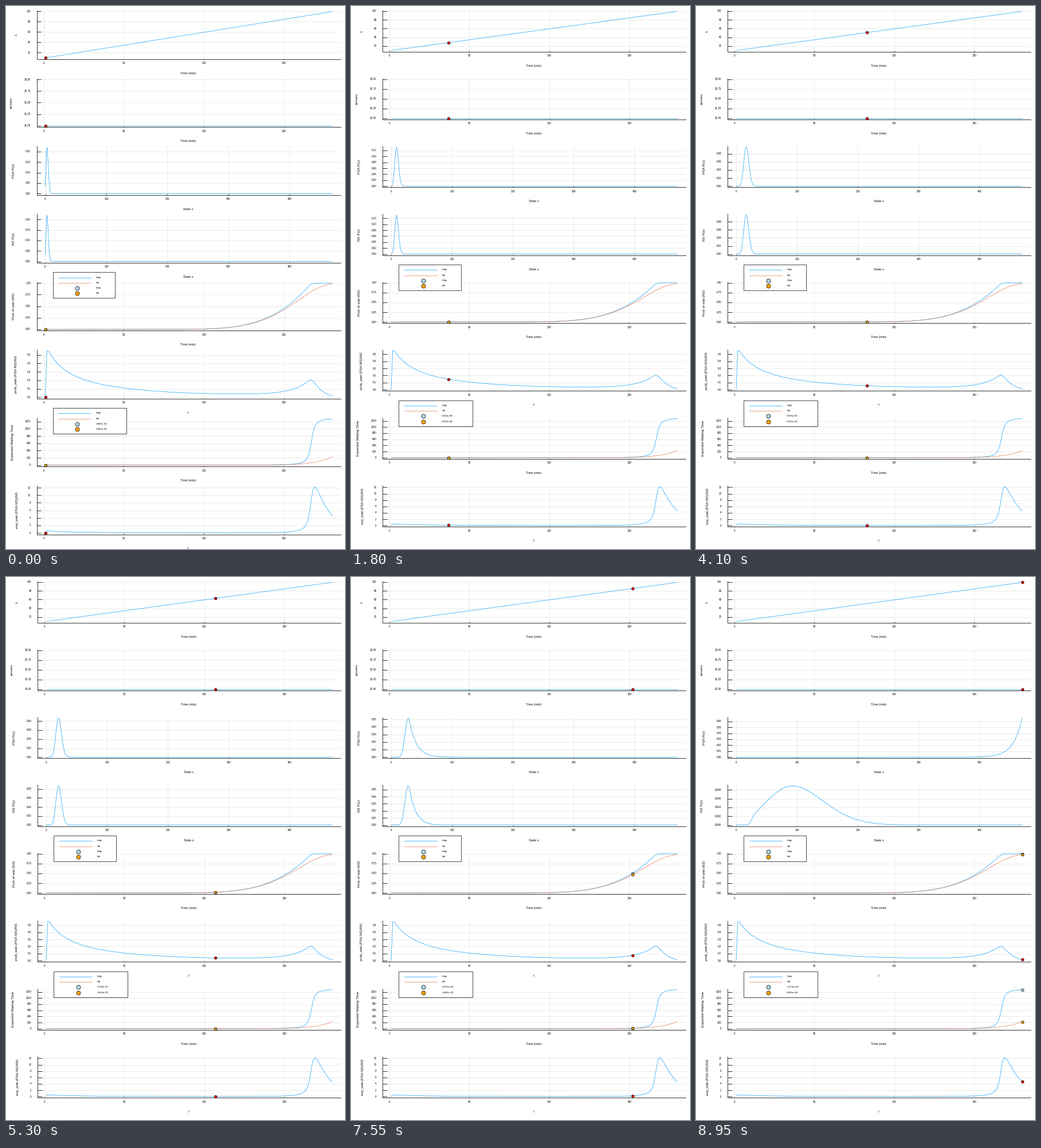
These frames come from a looping animation (591 px wide and 947 px high, 9 s). A matplotlib script:

```python
import math
import numpy as np
import matplotlib.pyplot as plt
from matplotlib.animation import FuncAnimation
from matplotlib.collections import LineCollection
from matplotlib.patches import Rectangle

W, H = 591, 947
DPI = 100
PT = 72 / DPI
BLUE, CORAL = "#009afa", "#e36f47"
THIN = 0.46
plt.rcParams["font.family"] = "Liberation Sans"

# ---- queue model: growing arrivals, fixed servers, finite room ----
SERVERS, MU, ROOM, STEPS = 31, 3.0, 470, 180
states = np.arange(ROOM + 1)
death = MU * np.minimum(states[1:], SERVERS)
time = np.arange(1, STEPS + 1)


def arrivals(t):
    return 10 + 0.5 * (t - 1)


def steady(lam):
    logp = np.concatenate(([0.0], np.cumsum(np.log(lam / death))))
    p = np.exp(logp - logp.max())
    return p / p.sum()


def slope(p, lam):
    flow = lam * p[:-1] - death * p[1:]
    d = np.zeros_like(p)
    d[:-1] -= flow
    d[1:] += flow
    return d


def evolve(sub=160):
    p = steady(arrivals(1))
    out = [p]
    h = 1 / sub
    for t in time[:-1]:
        for j in range(sub):
            lam = arrivals(t + j * h)
            mid, end = lam + 0.25 * h, lam + 0.5 * h
            k1 = slope(p, lam)
            k2 = slope(p + h / 2 * k1, mid)
            k3 = slope(p + h / 2 * k2, mid)
            k4 = slope(p + h * k3, end)
            p = p + h / 6 * (k1 + 2 * (k2 + k3) + k4)
        p = np.where(np.abs(p) < 1e-290, 0.0, p)
        out.append(p)
    return np.array(out)


psa = np.array([steady(arrivals(t)) for t in time])
ns = evolve()
queue = np.maximum(states - SERVERS, 0)
busy_psa, busy_ns = (p[:, SERVERS + 1:].sum(axis=1) for p in (psa, ns))
wait_psa, wait_ns = (MU * p @ queue for p in (psa, ns))
busy_gap = (busy_psa - busy_ns) / busy_ns
wait_gap = (wait_psa - wait_ns) / wait_ns
busy_gap[0] = wait_gap[0] = 0


# ---- axis helpers ----
def widen(lo, hi):
    m = 0.03 * (hi - lo)
    return lo - m, hi + m


def ticks(lo, hi):
    """Pick round tick values by scoring count, coverage and niceness."""
    span = hi - lo
    best, found = -1, None
    top = math.floor(math.log10(span))
    for z in range(top, top - 3, -1):
        for q, nice in ((5, .9), (3, .2), (2.5, .5), (2, .7), (1, 1)):
            step = q * 10.0 ** z
            a = math.ceil(lo / step - 1e-9)
            b = math.floor(hi / step + 1e-9)
            n = b - a + 1
            if not 4 <= n <= 8:
                continue
            score = (0.25 * (1 - abs(n - 5) / 5) + (a <= 0 <= b) / 6
                     + 0.5 * span / ((n - 1) * step) + 0.25 * nice)
            if score > best + 1e-9:
                places = max(0, -z + (q == 2.5))
                best = score
                found = [(k * step, f"{k * step:.{places}f}")
                         for k in range(a, b + 1)]
    return found


def em_width(s):
    return sum(0.278 if c == "." else 0.556 for c in s)


class Chart:
    right = 583.7

    def __init__(self, ax, row, left, height, xs, xlabel, ylabel):
        self.ax, self.left, self.h = ax, left, height
        self.top = 7.3 + row * H / 8
        self.bottom = self.top + height
        self.xlo, self.xhi = widen(xs[0], xs[-1])
        self.px = self.x(xs)
        self.grid = LineCollection([], colors="#e0e0e0", linewidths=THIN, zorder=1)
        self.marks = LineCollection([], colors="black", linewidths=0.55, zorder=2)
        ax.add_collection(self.grid)
        ax.add_collection(self.marks)
        self.labels = [self.text(left - 10.5, 0, "", 4.5, ha="right")
                       for _ in range(8)]
        self.xticks = [self.x(v) for v, _ in ticks(self.xlo, self.xhi)]
        for x, (_, s) in zip(self.xticks, ticks(self.xlo, self.xhi)):
            self.text(x, self.bottom + 6.9, s, 4.5)
        self.text((left + self.right) / 2 - 0.8, self.bottom + 24.4, xlabel, 5.6)
        self.name = self.text(0, self.top + height / 2 + 0.5, ylabel, 6.1,
                              rotation=90)
        self.shift = 3 if len(ylabel) == 1 else 0
        self.limits = None

    def text(self, x, y, s, size, ha="center", **kw):
        return self.ax.text(x, y, s, fontsize=size * PT, ha=ha, va="center",
                            color="black", **kw)

    def x(self, v):
        return self.left + (self.right - self.left) * (v - self.xlo) / (self.xhi - self.xlo)

    def y(self, v):
        lo, hi = self.limits
        return self.top + self.h * (hi - v) / (hi - lo)

    def scale(self, lo, hi):
        self.limits = widen(lo, hi)
        rows = ticks(*self.limits)
        ys = [self.y(v) for v, _ in rows]
        l, r, t, b = self.left, self.right, self.top, self.bottom
        self.grid.set_segments([[(l, y), (r, y)] for y in ys]
                               + [[(x, t), (x, b)] for x in self.xticks])
        self.marks.set_segments([[(l, t), (l, b)], [(l, b), (r, b)]]
                                + [[(l, y), (l + 7.8, y)] for y in ys]
                                + [[(x, b), (x, b - 1.2)] for x in self.xticks])
        for i, lab in enumerate(self.labels):
            lab.set_visible(i < len(rows))
            if i < len(rows):
                lab.set_text(rows[i][1])
                lab.set_y(ys[i])
        wide = max(em_width(s) for _, s in rows)
        self.name.set_x(self.left - 34.4 - 7.2 * (wide - 1.112) + self.shift)

    def curve(self, vals, color=BLUE):
        return self.ax.plot(self.px, self.y(vals), color=color, lw=THIN,
                            zorder=3)[0]

    def dot(self, color, size=3.3, z=4):
        return self.ax.plot([], [], "o", ms=size, mfc=color, mec="black",
                            mew=0.5, zorder=z)[0]

    def legend(self, width, names):
        x0, y0 = self.left + 28.2, self.bottom - 102
        self.ax.add_patch(Rectangle((x0, y0), width, 45, fc="white", ec="black",
                                    lw=0.5, zorder=5))
        out = []
        for i, s in enumerate(names):
            y = y0 + 9.2 * (i + 1)
            if i < 2:
                self.ax.plot([x0 + 9.5, x0 + 66.5], [y, y], lw=THIN, zorder=6,
                             color=(BLUE, CORAL)[i])
            else:
                self.dot(("lightblue", "orange")[i - 2], 5.1, 6).set_data(
                    [x0 + 42.6], [y])
            out.append(self.text(x0 + 75, y, s, 4.4, ha="left", zorder=6))
        return out


class Sheet:
    def __init__(self, fig, left, height):
        self.ax = ax = fig.add_axes([0, 0, 1, 1])
        ax.set_xlim(0, W)
        ax.set_ylim(H, 0)
        ax.set_autoscale_on(False)
        ax.axis("off")
        minutes = "Time (min)"
        spec = [(time, minutes, "λ"), (time, minutes, "servers"),
                (states, "State x", "PSA P(x)"), (states, "State x", "NS P(x)"),
                (time, minutes, "Prob of wait (NS)"),
                (time, "t", "prob_wait (PSA-NS)/NS"),
                (time, minutes, "Expected Waiting Time"),
                (time, "t", "exp_wait (PSA-NS)/NS")]
        charts = [Chart(ax, r, left, height, *s) for r, s in enumerate(spec)]
        self.dists = []
        for c, data in zip(charts[2:4], (psa, ns)):
            c.scale(0, data[0].max())
            self.dists.append((c, data, c.curve(data[0])))
        self.dots = []
        servers = np.full(STEPS, float(SERVERS))
        series = {0: [arrivals(time)], 1: [servers], 4: [busy_psa, busy_ns],
                  5: [busy_gap], 6: [wait_psa, wait_ns], 7: [wait_gap]}
        for r, rows in series.items():
            c = charts[r]
            lo, hi = min(v.min() for v in rows), max(v.max() for v in rows)
            c.scale(lo, hi if hi > lo else lo + 1)
            for v, color in zip(rows, (BLUE, CORAL)):
                c.curve(v, color)
            fills = ("lightblue", "orange") if len(rows) == 2 else ("red",)
            for v, fill in zip(rows, fills):
                self.dots.append((c, v, c.dot(fill)))
        charts[4].legend(108.6, ["PSA", "NS", "PSA", "NS"])
        self.values = charts[6].legend(128.4, ["PSA", "NS", "", ""])[2:]

    def show(self, i):
        for c, data, line in self.dists:
            p = data[i]
            c.scale(min(p.min(), 0), p.max())
            line.set_ydata(c.y(p))
        for c, v, dot in self.dots:
            dot.set_data([c.x(time[i])], [c.y(v[i])])
        for label, v in zip(self.values, (wait_psa, wait_ns)):
            label.set_text(f"{v[i]:.3e}")


fig = plt.figure(figsize=(W / DPI, H / DPI), dpi=DPI, facecolor="white")
# The opening view has taller charts than all later ones.
sheets = [Sheet(fig, 53.5, 85.6), Sheet(fig, 55, 72.3)]


def draw(i):
    use = min(i, 1)
    for k, s in enumerate(sheets):
        s.ax.set_visible(k == use)
    sheets[use].show(i)
    return []


anim = FuncAnimation(fig, draw, frames=STEPS, init_func=lambda: draw(0),
                     interval=50, repeat=True, repeat_delay=0, blit=False)
plt.show()
```
